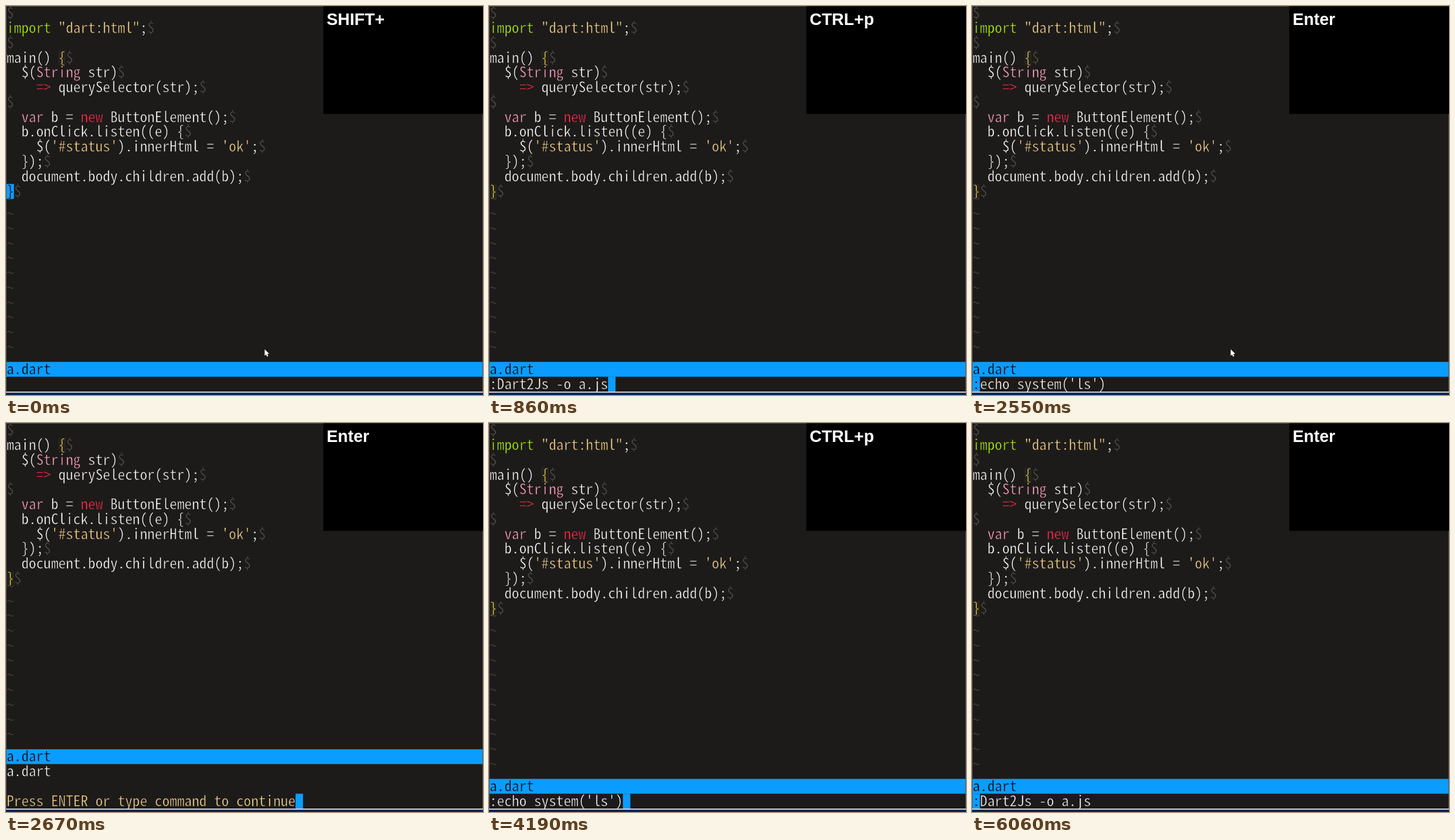
Write an HTML page with a canvas that moves like this. It is 829x676 px and loops after 8 s.

```html
<!DOCTYPE html>
<html lang="en">
<head>
<meta charset="utf-8">
<title>Dart in the editor</title>
<style>
  html, body { margin: 0; width: 100%; height: 100%; overflow: hidden; background: #1c1b1a; }
  canvas { display: block; }
</style>
</head>
<body>
<canvas id="stage" width="829" height="676"></canvas>
<script>
const ctx = document.getElementById('stage').getContext('2d');
const LOOP = 8000, CELL_W = 12.88, CELL_H = 25.77, LEFT = 0.9;
const BG = '#1c1b1a', MATCH_BG = '#242321', PLAIN = '#f8f6f2', BLUE = '#0a9dff', DIM = '#504b44',
      SAND = '#f4cf86', LIME = '#aeee00', PINK = '#ff9eb8', RED = '#ff2c4b', YELLOW = '#fade3e';

// Size the monospaced font so that one glyph fills one cell.
const FAMILY = '"Noto Sans Mono CJK JP", "Noto Sans Mono CJK SC", "Liberation Mono", monospace';
ctx.font = `300 100px ${FAMILY}`;
const CODE_FONT = `300 ${CELL_W * 100 / ctx.measureText('0').width}px ${FAMILY}`;

const SOURCE = `
import "dart:html";

main() {
  $(String str)
    => querySelector(str);

  var b = new ButtonElement();
  b.onClick.listen((e) {
    $('#status').innerHtml = 'ok';
  });
  document.body.children.add(b);
}`.split('\n');

const RULES = [
  [/"[^"]*"|'[^']*'/g, SAND],
  [/\bimport\b/g, LIME],
  [/\b(String|var)\b/g, PINK],
  [/\bnew\b|=>/g, RED],
  [/^}|(?<=^main.*){/g, YELLOW],
];

const COMPILE = ':Dart2Js -o a.js', LIST = ":echo system('ls')";
const PROMPT = 'Press ENTER or type command to continue';

// Each entry: start time and the properties that change then.
// cursor is a column of the command line, 'code' for the last brace, or null when blinked off.
const TIMELINE = [
  [0, { keys: 'SHIFT+', cmd: '', cursor: 'code', mouse: true, output: false }],
  [370, { cmd: ':', cursor: 1, mouse: false }],
  [740, { keys: 'CTRL+' }],
  [860, { keys: 'CTRL+p', cmd: COMPILE, cursor: 16 }],
  [1540, { cursor: null }],
  [1660, { keys: 'CTRL+pp' }],
  [1780, { cmd: LIST, cursor: 18 }],
  [2430, { cursor: null }],
  [2550, { keys: 'Enter', cursor: 0, mouse: true }],
  [2670, { cmd: PROMPT, cursor: 39, mouse: false, output: true }],
  [3450, { cmd: '', cursor: 'code', output: false }],
  [3820, { keys: 'SHIFT+' }],
  [3940, { cmd: ':', cursor: 1 }],
  [4190, { keys: 'CTRL+p', cmd: LIST, cursor: 18 }],
  [4470, { keys: 'CTRL+pp', cmd: COMPILE, cursor: 16 }],
  [5140, { cursor: null }],
  [5420, { cursor: 16 }],
  [5820, { cursor: null }],
  [5940, { keys: 'Enter' }],
  [6060, { cursor: 0 }],
];

function rect(x, y, w, h, color) {
  ctx.fillStyle = color;
  ctx.fillRect(x, y, w, h);
}

function cell(row, col, color) {
  rect(LEFT + col * CELL_W, row * CELL_H, CELL_W, CELL_H, color);
}

// A thin outline in the background colour makes the strokes lighter.
function text(row, col, string, color, back = BG, lift = 0) {
  ctx.font = CODE_FONT;
  ctx.strokeStyle = back;
  ctx.lineWidth = 0.6;
  ctx.lineJoin = 'round';
  [...string].forEach((ch, i) => {
    const x = LEFT + (col + i) * CELL_W, y = row * CELL_H + 21.3 - lift;
    ctx.fillStyle = typeof color === 'string' ? color : color[i];
    ctx.fillText(ch, x, y);
    ctx.strokeText(ch, x, y);
  });
}

function highlight(line) {
  const colors = Array(line.length).fill(PLAIN);
  for (const [pattern, color] of RULES)
    for (const match of line.matchAll(pattern))
      colors.fill(color, match.index, match.index + match[0].length);
  return colors;
}

function drawCursor(row, col, ch = '') {
  cell(row, col, BLUE);
  text(row, col, ch, '#000', BLUE);
}

function drawBuffer(scroll, statusRow) {
  SOURCE.slice(scroll).forEach((line, row) => {
    if (line.startsWith('main')) cell(row, 7, MATCH_BG);
    if (line === '}') cell(row, 0, MATCH_BG);
    text(row, 0, line, highlight(line));
    text(row, line.length, '$', DIM);
  });
  for (let row = SOURCE.length - scroll; row < statusRow; row++) text(row, 0, '~', DIM, BG, 12);
  rect(0, statusRow * CELL_H, 829, CELL_H, BLUE);
  text(statusRow, 0, 'a.dart', '#000', BLUE);
}

function drawMouse() {
  ctx.beginPath();
  [[449.5, 596.5], [449.5, 608], [452, 605.7], [453.8, 609.5], [455.8, 608.6],
   [454.1, 604.8], [457.6, 604.6]].forEach(p => ctx.lineTo(...p));
  ctx.closePath();
  ctx.lineWidth = 1;
  ctx.strokeStyle = '#000';
  ctx.stroke();
  ctx.fillStyle = '#fff';
  ctx.fill();
}

function drawFrame() {
  rect(0, 670, 829, 2, '#d4d4d4');
  rect(0, 672, 829, 4, '#06245a');
  rect(0, 0, 829, 1, '#555');
  rect(0, 0, 1, 670, '#555');
  rect(828, 0, 1, 670, '#555');
}

function drawKeys(keys) {
  rect(551.5, 0.5, 277.5, 187, '#000');
  ctx.font = 'bold 29px "Liberation Sans", Arial, sans-serif';
  ctx.fillStyle = '#fff';
  ctx.fillText(keys, 557.2, 33);
}

function draw(time) {
  const state = Object.assign({}, ...TIMELINE.filter(([at]) => at <= time).map(([, change]) => change));
  rect(0, 0, 829, 676, BG);
  drawBuffer(state.output ? 2 : 0, state.output ? 22 : 24);
  if (state.output) text(23, 0, 'a.dart', PLAIN);
  text(25, 0, state.cmd, state.output ? SAND : PLAIN);
  if (state.cursor === 'code') drawCursor(12, 0, '}');
  else if (state.cursor !== null) drawCursor(25, state.cursor, state.cmd[state.cursor]);
  if (state.mouse) drawMouse();
  drawFrame();
  drawKeys(state.keys);
}

function tick() {
  draw(performance.now() % LOOP);
  requestAnimationFrame(tick);
}
tick();
</script>
</body>
</html>
```
